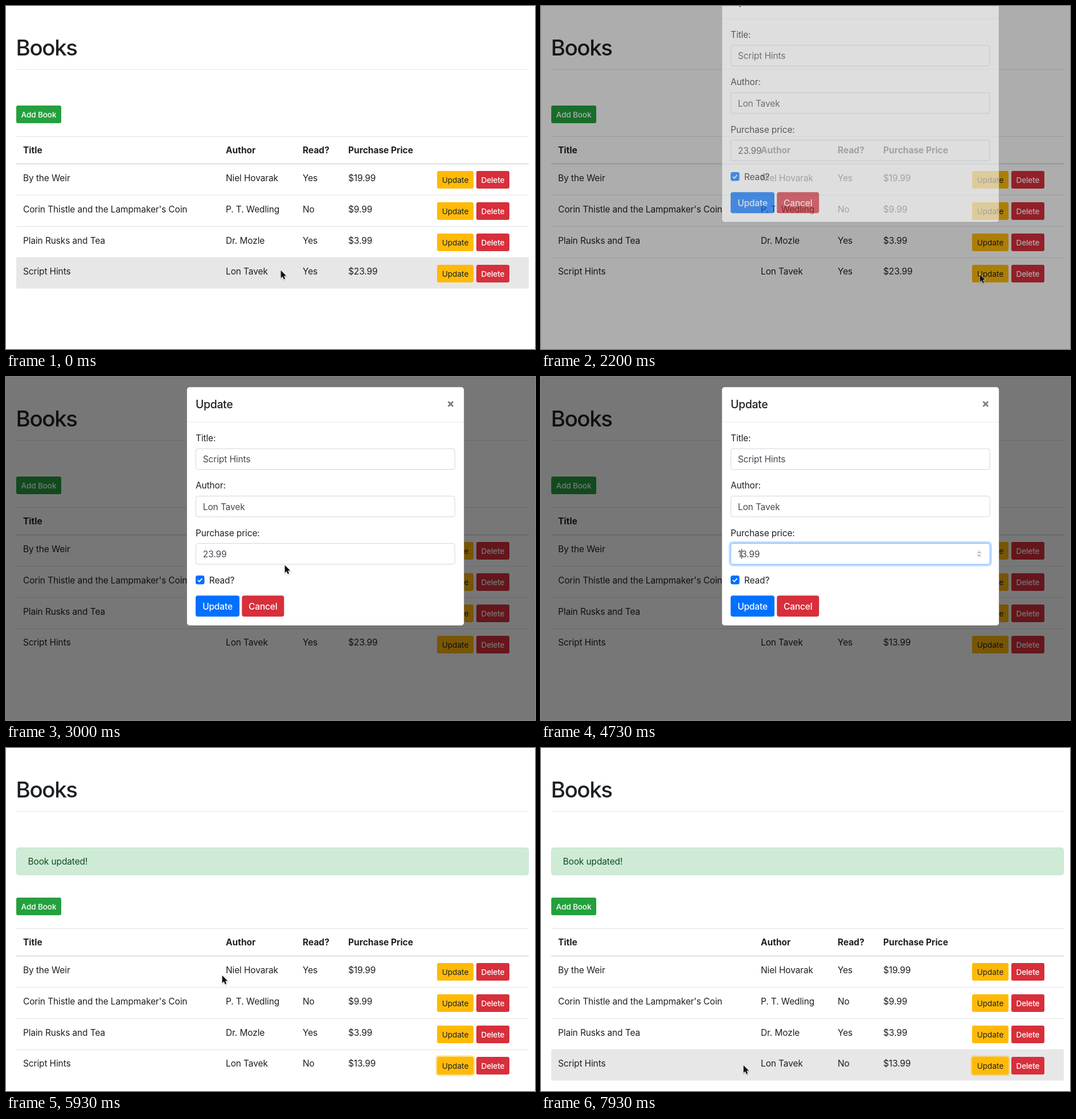
Write an HTML page that moves like this. It is 929 by 603 pixels and loops after 8.47 s.

```html
<!DOCTYPE html>
<html lang="en">
<head>
<meta charset="utf-8">
<title>Books</title>
<style>
  html, body { margin: 0; width: 100%; height: 100%; overflow: hidden; background: #fff; }
  svg { display: block; width: 100%; height: 100%; }
  text { font: 400 15.5px Inter, "Open Sans", sans-serif; letter-spacing: -.008em; fill: #1c2024; }
  .h1 { font-size: 38.5px; font-weight: 500; letter-spacing: -.036em; }
  .h5 { font-size: 19.4px; font-weight: 500; letter-spacing: -.016em; }
  .bold { font-weight: 700; letter-spacing: 0; }
  .small { font-size: 13.6px; letter-spacing: 0; }
  .white { fill: #fff; font-weight: 500; letter-spacing: -.01em; }
  .value { fill: #444a51; }
  .mid { text-anchor: middle; }
</style>
</head>
<body>
<svg id="stage" viewBox="0 0 929 603"></svg>
<script>
const LOOP = 8470, STEP = 1000 / 15, SHIFT = 88, PITCH = 54.8;
const YELLOW = '#ffba08', RED = '#d72f3b', GREEN = '#24a03e', BLUE = '#0070ff';

function add(parent, tag, attrs, content) {
  const el = document.createElementNS('http://www.w3.org/2000/svg', tag);
  set(el, attrs);
  if (content) el.textContent = content;
  return parent.appendChild(el);
}
function set(el, attrs) {
  for (const key in attrs) el.setAttribute(key, attrs[key]);
}
const show = (el, on) => set(el, { visibility: on ? 'visible' : 'hidden' });
const group = parent => add(parent, 'g', {});
const box = (parent, x, y, width, height, fill, more) =>
  add(parent, 'rect', { x, y, width, height, fill, ...more });
const label = (parent, x, y, content, cls = '') => add(parent, 'text', { x, y, class: cls }, content);
const path = (parent, d, more) => add(parent, 'path', { d, fill: 'none', ...more });

function button(parent, x, y, w, h, color, content, cls) {
  const large = h > 35;
  const face = box(parent, x, y, w, h, color, { rx: large ? 4 : 3 });
  label(parent, x + w / 2, y + h / 2 + (large ? 5.8 : 5.2), content, 'mid ' + cls);
  return face;
}

const stage = document.getElementById('stage');

// Page
const page = group(stage);
label(page, 17.5, 87, 'Books', 'h1');
box(page, 18, 111, 900, 1, '#e4e6e7');

const alertBox = group(page);
box(alertBox, 18.5, 175.5, 899, 47.5, '#cfebd6', { rx: 4, stroke: '#bbe3cf' });
label(alertBox, 38.5, 205, 'Book updated!').style.fill = '#0f4a1f';

const table = group(page);
button(table, 18, 175, 79, 31, GREEN, 'Add Book', 'small white');
const rowShade = box(table, 18, 442.5, 900, 54, '#e7e7e7');
const columns = [30, 386, 521, 601];
box(table, 18, 229, 900, 1, '#dde2e5');
['Title', 'Author', 'Read?', 'Purchase Price'].forEach((name, i) => label(table, columns[i], 259, name, 'bold'));
box(table, 18, 276.5, 900, 2, '#d9dfe2');

const books = [
  ['By the Weir', 'Niel Hovarak', 'Yes', '$19.99'],
  ["Corin Thistle and the Lampmaker's Coin", 'P. T. Wedling', 'No', '$9.99'],
  ['Plain Rusks and Tea', 'Dr. Mozle', 'Yes', '$3.99'],
  ['Script Hints', 'Lon Tavek', 'Yes', '$23.99']
];
let cells, updateFace;
books.forEach((book, r) => {
  const y = r * PITCH;
  const top = Math.round(290.3 + y);
  if (r) box(table, 18, Math.round(277.4 + y), 900, 1, '#dde2e5');
  cells = book.map((value, i) => label(table, columns[i], 308 + y, value));
  updateFace = button(table, 757, top, 64, 31, YELLOW, 'Update', 'small');
  button(table, 826, top, 58, 31, RED, 'Delete', 'small white');
});
const [, , readCell, priceCell] = cells;
const updateRing = box(table, 755.8, 453.8, 66.4, 33.4, 'none',
  { rx: 4, stroke: YELLOW, 'stroke-width': 2.4, 'stroke-opacity': .45 });

// Modal
const backdrop = box(stage, 0, 0, 929, 603, '#000');
const modal = group(stage);
box(modal, 317.5, 17.5, 487, 419.5, '#fff', { rx: 5, stroke: '#000', 'stroke-opacity': .25 });
label(modal, 333, 55, 'Update', 'h5');
path(modal, 'M776.5 43.2l8.6 8.6m0-8.6l-8.6 8.6', { stroke: '#7d7d7d', 'stroke-width': 2.8 });
box(modal, 318, 78.7, 486, 1, '#e6eaec');

const [, , priceField] = ['Title:', 'Author:', 'Purchase price:'].map((name, i) => {
  const y = i * 83.3;
  label(modal, 333, 113 + y, name);
  const frame = box(modal, 333.3, 126 + y, 455, 36.6, '#fff', { rx: 4, stroke: '#d0d5d9' });
  const value = label(modal, 345.8, 150.4 + y, [books[3][0], books[3][1], '23.99'][i], 'value');
  return { frame, value };
});
const fieldRing = box(modal, 331.3, 290.6, 459, 40.6, 'none',
  { rx: 5.5, stroke: BLUE, 'stroke-width': 3.2, 'stroke-opacity': .25 });
const spinner = group(modal);
box(spinner, 765.5, 304, 8, 14, '#f1f1f1', { rx: 3.5 });
path(spinner, 'M767.6 309.4l1.9-2 1.9 2m-3.8 3.4l1.9 2 1.9-2', { stroke: '#555' });
const caret = box(modal, 346, 302.5, 1, 17, '#111');

const checkBox = box(modal, 333, 349, 15.5, 15.5, BLUE, { rx: 3.5 });
const checkMark = path(modal, 'M337 357.2l2.6 2.6 4.8-5.6', { stroke: '#fff', 'stroke-width': 1.8 });
label(modal, 356.8, 362.8, 'Read?');
const saveFace = button(modal, 333, 384.3, 77, 37, BLUE, 'Update', 'white');
button(modal, 414.3, 384.3, 74, 37, RED, 'Cancel', 'white');

// Pointer
const pointer = group(stage);
const arrow = add(pointer, 'g', { transform: 'translate(.6 .8) scale(.92)' });
const arrowShape = 'M0 0V14.6L3.4 11.5L5.7 16.8L8.2 15.7L6 10.6H10.5Z';
path(arrow, arrowShape, { transform: 'translate(.3 1.5)', stroke: '#000', 'stroke-width': 2.5, 'stroke-opacity': .13 });
path(arrow, arrowShape, { fill: '#111', stroke: '#fff', 'stroke-width': 1.4, 'paint-order': 'stroke' });
const beam = path(pointer, 'M-3-8.5q3 0 3 2.5v12q0 2.5-3 2.5M3-8.5q-3 0-3 2.5m0 12q0 2.5 3 2.5',
  { stroke: '#222', 'stroke-width': 1.1 });

// time, x, y
const route = [
  [935, 482, 464], [1070, 520, 460], [1200, 610, 455], [1330, 700, 458], [1470, 756, 467], [1600, 770, 471],
  [2600, 770, 471], [2730, 725, 448], [2870, 600, 388], [3000, 489, 330], [3130, 395, 306],
  [3270, 350, 305], [3470, 359, 309.5], [3730, 356, 309.5],
  [5065, 356, 309.5], [5265, 341, 356], [5335, 341, 356], [5535, 379, 399],
  [7265, 379, 399], [7400, 374, 440], [7530, 362, 515], [7735, 355, 557]
];
function pointerAt(t) {
  const i = route.findIndex(p => p[0] > t);
  if (i === 0) return route[0].slice(1);
  if (i < 0) return route.at(-1).slice(1);
  const [t0, x0, y0] = route[i - 1], [t1, x1, y1] = route[i];
  const k = (t - t0) / (t1 - t0);
  return [x0 + (x1 - x0) * k, y0 + (y1 - y0) * k];
}
const ramp = (t, start, length) => Math.min(1, Math.max(0, (t - start) / length));
const easeOut = p => 1 - (1 - p) ** 1.7;
const inside = (x, y, l, t, r, b) => x > l && x < r && y > t && y < b;

const OPEN = 2110, FOCUS = 3900, ERASE = 4395, TYPE = 4725, UNCHECK = 5330, CLOSE = 5590, SAVED = 5795;

function render(ms) {
  const t = Math.floor((ms + 5) / STEP) * STEP;
  const [x, y] = pointerAt(t);
  const saved = t >= SAVED;
  const opened = t > OPEN && t < CLOSE + 150;
  const shift = saved ? SHIFT : 0;

  // Table state
  show(alertBox, saved);
  set(table, { transform: `translate(0 ${shift})` });
  const row = Math.floor((y - shift - 278) / PITCH);
  const hovering = (t < 2060 || t > 5990) && row >= 0 && row < 4;
  show(rowShade, hovering);
  set(rowShade, { y: 278.2 + row * PITCH });
  const pressed = t > 1655 && t < OPEN;
  const overUpdate = t < OPEN && inside(x, y, 757, 455, 821, 485);
  set(updateFace, { fill: pressed ? '#d69b08' : overUpdate ? '#e3a50a' : YELLOW });
  show(updateRing, pressed || saved);

  // Form state
  const price = t < ERASE ? '23.99' : t < TYPE ? '3.99' : '13.99';
  const checked = t < UNCHECK;
  priceField.value.textContent = price;
  priceCell.textContent = '$' + price;
  readCell.textContent = checked ? 'Yes' : 'No';
  set(checkBox, { fill: checked ? BLUE : '#fff', stroke: checked ? 'none' : '#b5b5b5' });

  const fade = ramp(t, OPEN, 150) * (1 - ramp(t, CLOSE, 150));
  const drop = t < CLOSE ? 1 - easeOut(ramp(t, OPEN, 300)) : easeOut(ramp(t, CLOSE, 300));
  set(backdrop, { opacity: fade * .535 });
  set(modal, { opacity: fade, transform: `translate(0 ${Math.round(-105 * drop)})` });
  show(modal, opened);

  const focused = opened && t > FOCUS && t < UNCHECK;
  const overField = opened && t > 2500 && inside(x, y, 333, 292, 789, 329);
  set(priceField.frame, { stroke: focused ? '#7fb8ff' : '#d0d5d9' });
  set(fieldRing, { opacity: ramp(t, FOCUS, 150) });
  show(fieldRing, focused);
  show(spinner, focused || overField);
  show(checkMark, opened && checked);
  set(saveFace, { fill: opened && t > 2500 && inside(x, y, 333, 384, 410, 421) ? '#0062dc' : BLUE });

  const typed = t < ERASE || t >= TYPE;
  set(caret, { x: 345.8 + (typed ? priceField.value.getSubStringLength(0, 1) : 0) });
  show(caret, focused && t < 4925);

  // Pointer
  set(pointer, { transform: `translate(${x} ${y})` });
  const typing = t > ERASE && t < 5125;
  show(arrow, !overField);
  show(beam, overField && !typing);
}

const start = performance.now();
function tick() {
  render((performance.now() - start) % LOOP);
  requestAnimationFrame(tick);
}
tick();
</script>
</body>
</html>
```
